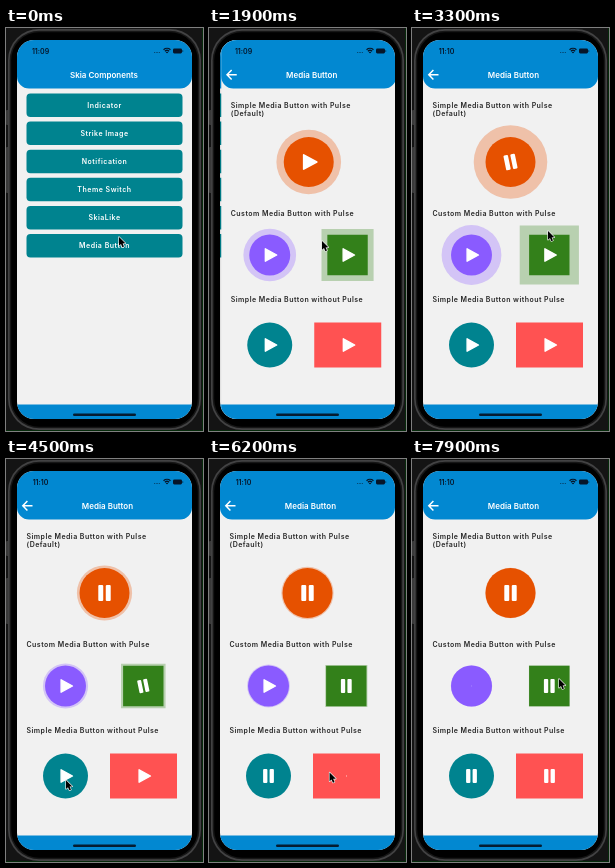
Recreate the animation shown at these times as an HTML page with a canvas. Size 197 by 403 pixels, loop 8000 ms.

```html
<!DOCTYPE html>
<html lang="en">
<head>
<meta charset="utf-8">
<title>Media Button</title>
<style>
html, body { margin: 0; width: 100%; height: 100%; overflow: hidden; background: #141414; }
canvas { display: block; width: 100vw; height: 100vh; filter: blur(0.35px); }
</style>
</head>
<body>
<canvas id="stage"></canvas>
<script>
const W = 197, H = 403, LOOP = 8000, STEP = 100;
const SCREEN = { x: 11, y: 12, w: 175, h: 379 };
const BLUE = '#0288d1', TEAL = '#00838f', PAPER = '#f1f1f1';
const FONT = 'Inter, "Liberation Sans", sans-serif';
const canvas = document.getElementById('stage');
const ctx = canvas.getContext('2d');

const MENU = ['Indicator', 'Strike Image', 'Notification', 'Theme Switch', 'SkiaLike', 'Media Button'];
const BUTTONS = [
  { x: 98.5, y: 134, w: 25, h: 25, round: true, color: '#e65100', pulse: 11.8, icon: 1.15, press: 2390 },
  { x: 59.5, y: 227, w: 20.5, h: 20.5, round: true, color: '#8a5bff', pulse: 9.4, icon: 1, press: 7480 },
  { x: 137.3, y: 227, w: 20.2, h: 20.2, color: '#33801a', pulse: 9.4, icon: 1, press: 3590 },
  { x: 59.5, y: 317, w: 22.5, h: 22.5, round: true, color: TEAL, icon: 1, press: 4600 },
  { x: 137.5, y: 317, w: 33.5, h: 22.5, color: '#ff5252', icon: 1, press: 5600 }
];
const HEADINGS = [
  ['Simple Media Button with Pulse', 79.5], ['(Default)', 88.3],
  ['Custom Media Button with Pulse', 187.7], ['Simple Media Button without Pulse', 274]
];
// time, x, y of the pointer tip
const POINTER = [
  [0, 113, 209], [600, 113, 209], [800, 113, 213], [2000, 113, 213],
  [2350, 101, 143], [2600, 101, 143], [3300, 136, 203], [3500, 139, 225],
  [3750, 139, 225], [4450, 60, 321], [4700, 60, 323], [5300, 141, 329],
  [5600, 141, 332], [5850, 141, 331], [6900, 49, 252], [7200, 57, 229],
  [7500, 57, 229], [7900, 147, 220]
];

const clamp = v => Math.max(0, Math.min(1, v));
const ease = v => v < 0.5 ? 2 * v * v : 1 - 2 * (1 - v) * (1 - v);
const ramp = (t, start, length) => ease(clamp((t - start) / length));

function box(x, y, w, h, r, color) {
  ctx.beginPath();
  ctx.roundRect(x, y, w, h, r);
  ctx.fillStyle = color;
  ctx.fill();
}

function label(str, x, y, size, color, align = 'left', spacing = 0) {
  ctx.font = `600 ${size}px ${FONT}`;
  ctx.textAlign = align;
  ctx.letterSpacing = spacing + 'px';
  ctx.fillStyle = color;
  ctx.fillText(str, x, y);
}

function polygon(points) {
  ctx.beginPath();
  points.forEach(([x, y]) => ctx.lineTo(x, y));
  ctx.closePath();
}

function card(title, titleX) {
  ctx.fillStyle = PAPER;
  ctx.fillRect(SCREEN.x, SCREEN.y, SCREEN.w, SCREEN.h);
  box(SCREEN.x, SCREEN.y, SCREEN.w, 48.5, [0, 0, 12, 12], BLUE);
  ctx.fillStyle = BLUE;
  ctx.fillRect(SCREEN.x, 376.5, SCREEN.w, 15);
  label(title, titleX, 49.8, 8, '#fff', 'center');
}

function menuPage(t) {
  card('Skia Components', 98);
  MENU.forEach((name, i) => {
    const y = 65.5 + i * 28.1;
    const pressed = i === 5 ? ramp(t, 600, 200) - ramp(t, 900, 300) : 0;
    ctx.globalAlpha = 1 - 0.5 * pressed;
    box(20.5, y, 156, 23.5, 4, TEAL);
    label(name, 98.5, y + 14.3, 7, '#fff', 'center', 0.5);
    ctx.globalAlpha = 1;
  });
}

function buttonShape(b, grow) {
  ctx.beginPath();
  if (b.round) ctx.arc(b.x, b.y, b.w + grow, 0, 2 * Math.PI);
  else ctx.rect(b.x - b.w - grow, b.y - b.h - grow, 2 * (b.w + grow), 2 * (b.h + grow));
  ctx.fillStyle = b.color;
  ctx.fill();
}

// The play sign shrinks through half a turn, then the pause sign grows through the other half.
function icon(b, t) {
  const out = ramp(t, b.press, 500), back = ramp(t, b.press + 500, 500);
  const size = b.icon * (back > 0 ? back : 1 - out);
  if (size <= 0) return;
  ctx.save();
  ctx.translate(b.x, b.y);
  ctx.rotate(Math.PI * (out + back));
  ctx.scale(size, size);
  ctx.fillStyle = ctx.strokeStyle = '#fff';
  ctx.lineJoin = 'round';
  ctx.lineWidth = 1.4;
  if (back > 0) {
    for (const x of [-5.4, 1.1]) box(x, -7, 4.3, 14, 1, '#fff');
  } else {
    polygon([[-4.4, -6.2], [7, 0], [-4.4, 6.2]]);
    ctx.fill();
    ctx.stroke();
  }
  ctx.restore();
}

function backArrow() {
  ctx.strokeStyle = '#fff';
  ctx.lineWidth = 1.5;
  ctx.lineJoin = 'miter';
  ctx.beginPath();
  ctx.moveTo(26.5, 46.7);
  ctx.lineTo(17, 46.7);
  ctx.moveTo(21.4, 42);
  ctx.lineTo(16.8, 46.7);
  ctx.lineTo(21.4, 51.4);
  ctx.stroke();
}

function mediaPage(t) {
  card('Media Button', 101.5);
  backArrow();
  for (const [str, y] of HEADINGS) label(str, 20.5, y, 7, '#262626', 'left', 0.46);
  const wave = (1 + Math.cos(2 * Math.PI * (t - 3320) / 1800)) / 2;
  for (const b of BUTTONS) {
    if (b.pulse) {
      ctx.globalAlpha = 0.3;
      buttonShape(b, b.pulse * wave);
      ctx.globalAlpha = 1;
    }
    buttonShape(b, 0);
    icon(b, t);
  }
}

// Critically damped push, with the old page sliding away at a third of the speed.
function pages(t) {
  const s = Math.max(0, t - 1515) / 1000 * 18.26;
  const p = t > 2300 ? 1 : 1 - Math.exp(-s) * (1 + s);
  if (p < 1) {
    ctx.save();
    ctx.translate(-0.3 * SCREEN.w * p, 0);
    menuPage(t);
    ctx.restore();
    ctx.fillStyle = `rgba(0,0,0,${0.07 * p})`;
    ctx.fillRect(SCREEN.x, SCREEN.y, SCREEN.w, SCREEN.h);
  }
  if (p > 0) {
    ctx.save();
    ctx.translate(SCREEN.w * (1 - p), 0);
    mediaPage(t);
    ctx.restore();
  }
}

function statusBar(t) {
  const ink = '#06162a';
  label(t < 2700 ? '11:09' : '11:10', 34.5, 25.6, 7, ink, 'center');
  for (let i = 0; i < 4; i++) box(148 + i * 1.7, 24, 0.9, 1, 0.4, ink);
  ctx.strokeStyle = ink;
  ctx.lineWidth = 1.3;
  for (const r of [1.2, 3.2, 5.2]) {
    ctx.beginPath();
    ctx.arc(161, 25.6, r, -2.3, -0.84);
    ctx.stroke();
  }
  box(167, 20.6, 9, 4.8, 1.3, ink);
  box(176.4, 22.2, 0.8, 1.6, 0.4, ink);
}

function phone() {
  ctx.fillStyle = '#141414';
  ctx.fillRect(0, 0, W, H);
  ctx.fillStyle = '#052a0a';
  ctx.fillRect(W - 1, 0, 1, H);
  ctx.fillRect(0, H - 1, W, 1);
  box(0, 82, 3, 15, 1, '#3a3a3a');
  box(0, 119, 3, 46, 1, '#3a3a3a');
  box(2, 1, 193, 401, 31, '#424243');
  box(3.7, 2.7, 189.6, 397.6, 29.5, '#161616');
  box(5.2, 4.2, 186.6, 394.6, 28, '#000');
}

function pointer(t) {
  let i = POINTER.findIndex(k => k[0] > t);
  if (i < 0) i = POINTER.length - 1;
  const [t0, x0, y0] = POINTER[i - 1], [t1, x1, y1] = POINTER[i];
  const p = ramp(t, t0, t1 - t0);
  ctx.save();
  ctx.translate(x0 + (x1 - x0) * p, y0 + (y1 - y0) * p);
  polygon([[0, 0], [0, 8.8], [2, 7], [3.4, 10.2], [5, 9.5], [3.6, 6.4], [6.3, 6.3]]);
  ctx.lineJoin = 'round';
  ctx.lineWidth = 1.3;
  ctx.strokeStyle = '#eee';
  ctx.stroke();
  ctx.fillStyle = '#000';
  ctx.fill();
  ctx.restore();
}

function draw(t) {
  phone();
  ctx.save();
  ctx.beginPath();
  ctx.roundRect(SCREEN.x, SCREEN.y, SCREEN.w, SCREEN.h, 17);
  ctx.clip();
  pages(t);
  statusBar(t);
  box(67, 385.6, 63, 2.4, 1.2, '#051c30');
  ctx.restore();
  pointer(t);
}

function frame(now) {
  const dpr = window.devicePixelRatio || 1;
  const w = Math.round(innerWidth * dpr), h = Math.round(innerHeight * dpr);
  if (canvas.width !== w || canvas.height !== h) {
    canvas.width = w;
    canvas.height = h;
  }
  ctx.setTransform(w / W, 0, 0, h / H, 0, 0);
  draw(Math.floor(now % LOOP / STEP) * STEP);
  requestAnimationFrame(frame);
}
requestAnimationFrame(frame);
</script>
</body>
</html>
```
